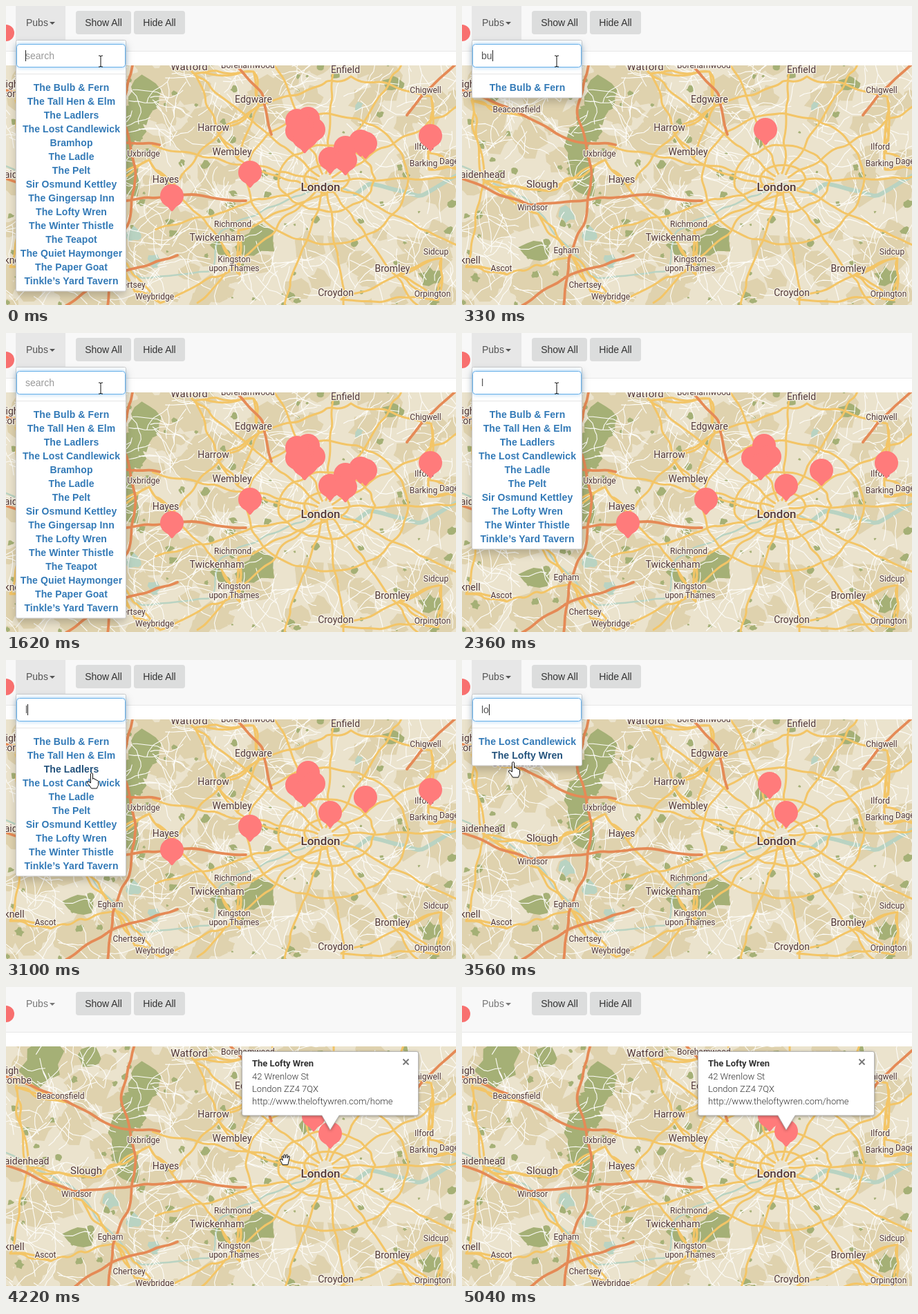
Write an HTML page that moves like this. It is 651 px wide and 433 px high and loops after 5140 ms.

```html
<!DOCTYPE html>
<html lang="en">
<head>
<meta charset="utf-8">
<title>Pub finder map</title>
<style>
  html, body { margin: 0; width: 100%; height: 100%; overflow: hidden; background: #fff; }
  svg { display: block; width: 651px; height: 433px; }
  text { font: 14px "Liberation Sans", Arial, sans-serif; }
  .road { fill: none; stroke-linecap: round; stroke-linejoin: round; }
  .label text { font-family: Roboto, sans-serif; fill: #523735; stroke: #f5f1e6; stroke-width: 2.5px;
    stroke-linejoin: round; paint-order: stroke; text-anchor: middle; }
  .info text { font: 300 13px Roboto, sans-serif; fill: #333; }
  .info .title { font-weight: 700; }
  .info .box { fill: #fff; stroke: #aaa; stroke-width: .8; filter: drop-shadow(0 1px 2px rgba(0,0,0,.35)); }
  .panel { fill: #fff; stroke: #c9c9c9; filter: drop-shadow(0 6px 6px rgba(0,0,0,.19)); }
  .field { fill: #fff; stroke: #66afe9; filter: drop-shadow(0 0 3px rgba(102,175,233,.6)); }
  .item { font-weight: 700; letter-spacing: .1px; text-anchor: middle; fill: #337ab7; }
  .item.hover { fill: #23527c; }
</style>
</head>
<body>
<svg id="stage" viewBox="0 0 651 433"></svg>
<script>
const LOOP = 5140, FRAME = 92.5, BLINK = 530;
const CLICK = 3835, INFO = 3927, DRAG = 4020, BOUNCE = 3993;
const SELECT = 967, CLEAR = 1060;

// name, x and y of the pin head
const pubs = [
  ['The Bulb & Fern', 439, 179], ['The Tall Hen & Elm', 437, 163], ['The Ladlers', 353, 241],
  ['The Lost Candlewick', 445, 179], ['Bramhop', 428, 172], ['The Ladle', 421, 181],
  ['The Pelt', 240, 275], ['Sir Osmund Kettley', 432, 191], ['The Gingersap Inn', 421, 166],
  ['The Lofty Wren', 469, 221], ['The Winter Thistle', 614, 188], ['The Teapot', 513, 196],
  ['The Quiet Haymonger', 491, 205], ['The Paper Goat', 491, 223], ['Tinkle’s Yard Tavern', 520, 199]
];
const chosen = 'The Lofty Wren';

// what the search field holds after each key press
const typing = [[0, ''], [227, 'b'], [320, 'bu'], [412, 'bul'], [CLEAR, ''], [1800, 'l'], [3280, 'lo']];

// time, x and y of the pointer, joined by straight moves
const pointer = [
  [0, 137, 80], [2600, 137, 80], [2720, 140, 80], [2820, 140, 80], [3090, 124, 163], [3280, 124, 163],
  [3550, 74, 147], [CLICK, 80, 142], [DRAG, 80, 142], [4200, 404, 250], [4297, 408, 252], [4482, 577, 378], [4570, 700, 460]
];

// size: town, centre and baseline
const labels = {
  12: 'Borehamwood 350 90, Chigwell 607 126, Ilford 605 208, Barking 604 232, Dagenham 656 229, Uxbridge 199 218, ' +
      'Windsor 102 296, Beaconsfield 79 154, Richmond 328 320, Kingston 330 371, upon Thames 330 384, Egham 151 358, ' +
      'Chertsey 178 408, Ascot 57 384, Weybridge 215 425, Sidcup 622 360, Orpington 617 421',
  14: 'Enfield 491 97, Edgware 358 140, Harrow 300 181, Wembley 327 216, Hayes 231 256, Maidenhead 24 249, High 4 118, ' +
      'Wycombe 6 132, Twickenham 305 340, Bracknell -2 373, Bromley 559 385, Croydon 477 420',
  15: 'Watford 265 93, Slough 116 263',
  17: 'London 455 268'
};
const towns = Object.entries(labels).flatMap(([size, list]) => list.split(', ').map(entry => {
  const [, name, x, y] = entry.match(/(.+) (\S+) (\S+)$/);
  return { name, x: +x, y: +y, size };
}));

const motorways = [
  [[188, 70], [166, 150], [188, 240], [180, 305], [154, 365], [147, 435]],
  [[0, 250], [98, 289], [187, 280], [262, 273], [347, 282]],
  [[0, 122], [80, 153], [165, 197], [222, 201]],
  [[325, 78], [372, 128], [384, 186]],
  [[651, 84], [605, 125], [580, 158]],
  [[85, 435], [150, 392], [248, 361]]
];
const thames = [[0, 232], [100, 285], [150, 345], [190, 393], [298, 385], [310, 325], [402, 284], [466, 256], [505, 273]];
const estuary = [[505, 273], [525, 257], [562, 266], [600, 276], [651, 246]];

// centre and radius
const woods = [[52, 104, 32], [122, 96, 15], [362, 340, 23], [106, 356, 19], [433, 194, 10], [560, 112, 13], [308, 350, 10], [614, 392, 14]];
const lakes = [[152, 302, 12], [187, 331, 11], [214, 369, 9], [510, 145, 6]];

const cursors = {
  beam: '<path d="M-3-8h2l1 1 1-1h2M0-7V7M-3 8h2l1-1 1 1h2" fill="none" stroke="#111"/>',
  point: '<path d="M-1.5 1.5q1.5-2 3 0v8l1-1q2 0 2 1.5 2-.5 2.5 1.2 2.3-.2 2.5 1.5v6q-1 1-2 4.3h-8q-2-4-6-8-.5-2.5 2-2l3 2z" fill="#fff" stroke="#111"/>',
  grab: '<path d="M-4 7.5C-5 4-8 1-7.5-.5q1.500-1 4 1.500L-5-4q.2-1.600 1.700-1L-2-2-2.200-6.500q1-1.800 2.200 0l.5 4 1-4.500q1.500-1.200 2 .5l-.4 4.500 1.600-3q1.600-.6 1.600 1L5 2 3.800 7.500z" fill="#fff" stroke="#111"/>'
};

const rand = (seed => () => (seed = seed * 16807 % 2147483647) / 2147483647)(4217);
const jitter = size => (rand() - .5) * 2 * size;
const times = (count, make) => Array.from({ length: count }, (_, i) => make(i));
const clamp = v => Math.min(1, Math.max(0, v));
const distance = (a, b) => Math.hypot(a.x - b.x, a.y - b.y);
const point = (x, y) => `${x.toFixed(1)} ${y.toFixed(1)}`;

// a winding line through the key points
function winding(keys, amount = 3) {
  const p = [keys[0]];
  keys.slice(1).forEach(([x, y], i) => {
    const [u, v] = keys[i], parts = Math.ceil(Math.hypot(x - u, y - v) / 16);
    for (let k = 1; k < parts; k++)
      p.push([u + (x - u) * k / parts + jitter(amount), v + (y - v) * k / parts + jitter(amount)]);
    p.push([x, y]);
  });
  const bends = p.slice(1, -1).map(([x, y], i) =>
    `Q${point(x, y)} ${point((x + p[i + 2][0]) / 2, (y + p[i + 2][1]) / 2)}`);
  return `M${point(...p[0])}${bends.join('')}L${point(...p[p.length - 1])}`;
}
const road = (d, color, width) => `<path class="road" d="${d}" stroke="${color}" stroke-width="${width}"/>`;

function blob([x, y, r]) {
  return 'M' + times(11, i => {
    const d = r * (.6 + rand() * .65), a = i * Math.PI * 2 / 11;
    return point(x + d * 1.1 * Math.cos(a), y + d * Math.sin(a));
  }).join('L') + 'z';
}

// patches that keep clear of the city centre
const scatter = (count, size, gap) => times(count, () => [rand() * 651, 74 + rand() * 360, size * (.3 + rand())])
  .filter(([x, y]) => Math.hypot((x - 455) / 1.3, y - 250) > gap).map(blob).join('');

const streets = count => times(count, () => {
  let a = rand() * 6.3;
  return `M${point(rand() * 651, 74 + rand() * 360)}` + times(6, () => {
    const step = 5 + rand() * 8;
    a += jitter(.5);
    return `l${point(step * Math.cos(a), step * Math.sin(a))}`;
  }).join('');
}).join('');

// main roads: spokes and rings around the centre, then links between neighbouring towns
const spokes = times(13, i => {
  const a = (i * 360 / 13 - 2) * Math.PI / 180;
  return winding([12, 120, 255].map(r => [462 + r * Math.cos(a), 254 + r * Math.sin(a)]), 4);
});
const rings = [[33, 20], [70, 48], [118, 95]].map(([rx, ry]) => winding(times(17, i => {
  const a = i * Math.PI / 8;
  return [464 + rx * Math.cos(a), 250 + ry * Math.sin(a)];
}), 3));
const links = towns.flatMap(town => towns.filter(other => distance(town, other) > 40)
  .sort((a, b) => distance(town, a) - distance(town, b)).slice(0, 2)
  .map(other => winding([[town.x + 8, town.y + 5], [other.x + 8, other.y + 5]], 5)));
const mainRoads = [...spokes, ...rings, ...links].join('');
const orangeRoads = motorways.map(keys => winding(keys, 2)).join('');

const valley = times(10, i => [184 + 16 * Math.cos(i * .5), 122 + i * 15, 19]);

const map = `
  <rect y="70" width="651" height="370" fill="#ebe3cd"/>
  <path d="${scatter(210, 21, 95)}" fill="#dfd2ae"/>
  <path d="${scatter(110, 5, 45) + [...woods, ...valley].map(blob).join('')}" fill="#a5b076"/>
  <path d="${lakes.map(blob).join('')}" fill="#b9d3c2"/>
  ${road(winding(thames), '#b9d3c2', 2.5)}${road(winding(estuary, 1), '#b9d3c2', 6)}
  ${road(streets(430), '#fdfcf8', 1.1)}
  ${road(mainRoads, '#f3c567', 3)}
  ${road(orangeRoads, '#e58a56', 3.8)}
  <g class="label">${towns.map(({ name, x, y, size }) =>
    `<text x="${x}" y="${y}" style="font-size:${size}px;font-weight:${size > 16 ? 500 : 400}">${name}</text>`).join('')}</g>`;

const button = (x, width, label) => `<rect x="${x}" y="7" width="${width}" height="34" rx="4" fill="#dcdddd"/>
  <text x="${x + width / 2}" y="29" text-anchor="middle" fill="#333">${label}</text>`;

const stage = document.getElementById('stage');
stage.innerHTML = `
  <clipPath id="view"><rect y="86" width="651" height="347"/></clipPath>
  <rect width="651" height="433" fill="#fff"/>
  <g clip-path="url(#view)"><g id="pan">${map}
    ${pubs.map(() => `<path class="pin" fill="#ff7b7b"
      d="M-17 0a17 17 0 1 1 34 0c0 8-5 13-11 16L1.5 21.5q-1.5 1.5-3 0L-6 16c-6-3-11-8-11-16z"/>`).join('')}
    <g class="info" id="info">
      <path class="box" d="M344 85.5H594q2.5 0 2.5 2.5V175.5q0 2.5-2.5 2.5H482L469 199 457 178H344q-2.5 0-2.5-2.5V88q0-2.5 2.5-2.5z"/>
      <text class="title" x="356" y="107">${chosen}</text>
      ${['42 Wrenlow St', 'London ZZ4 7QX', 'http://www.theloftywren.com/home'].map((line, i) =>
        `<text x="356" y="${126 + 18 * i}">${line}</text>`).join('')}
      <path d="M574.5 96.5l8 8m0-8l-8 8" stroke="#777" stroke-width="1.8"/>
    </g>
  </g></g>
  <rect width="651" height="65" fill="#f8f8f8"/><rect y="65" width="651" height="1" fill="#e7e7e7"/>
  <circle cx="0" cy="39" r="12" fill="#f8706f"/>
  <rect id="tab" x="14" width="72" height="50" fill="#e7e7e7"/>
  <g id="tabText"><text x="29" y="29">Pubs</text><path d="M63 23h8l-4 4z"/></g>
  ${button(101, 80, 'Show All')}${button(185, 74, 'Hide All')}
  <g id="menu">
    <rect class="panel" id="panel" x="14.5" y="49.5" width="159" rx="2"/>
    <rect class="field" x="15.5" y="55.5" width="157" height="33" rx="4"/>
    <rect id="selection" x="28" y="64" height="16" fill="#3390ff"/>
    <text id="query" x="28" y="77"></text>
    <rect id="caret" y="64" width="1" height="16" fill="#222"/>
    <rect x="15" y="98" width="158" height="1" fill="#e5e5e5"/>
    ${pubs.map(([name]) => `<text class="item" x="94.5">${name.replace('&', '&amp;')}</text>`).join('')}
  </g>
  <g id="cursor"></g>`;

const get = id => document.getElementById(id);
const set = (node, attrs) => Object.entries(attrs).forEach(([key, value]) => node.setAttribute(key, value));
const show = (node, on) => set(node, { display: on ? 'inline' : 'none' });
const pins = [...stage.querySelectorAll('.pin')], items = [...stage.querySelectorAll('.item')];

const bounce = t => t < BOUNCE ? 0 : 20 * (1 - (2 * ((t - BOUNCE) / 700 % 1) - 1) ** 2);

function pointerAt(t) {
  const i = pointer.findIndex(([time]) => time > t);
  if (i < 0) return pointer[pointer.length - 1].slice(1);
  const [t0, x0, y0] = pointer[i - 1], [t1, x1, y1] = pointer[i], k = (t - t0) / (t1 - t0);
  return [Math.round(x0 + (x1 - x0) * k), Math.round(y0 + (y1 - y0) * k)];
}

function draw(time) {
  const t = Math.max(0, DRAG + Math.floor((time - DRAG) / FRAME) * FRAME + .5);
  const [pressed, text] = typing.filter(([start]) => start <= t).pop();
  const open = t < CLICK, selected = t >= SELECT && t < CLEAR;
  const matches = pubs.filter(([name]) => name.toLowerCase().includes(text));
  const [px, py] = pointerAt(t);
  const row = py < 90 ? -1 : Math.floor((py - 108) / 20);

  pubs.forEach((pub, i) => {
    const [name, x, y] = pub, place = matches.indexOf(pub);
    show(pins[i], place >= 0);
    show(items[i], place >= 0);
    set(items[i], { y: 123 + 20 * place, class: place === row ? 'item hover' : 'item' });
    set(pins[i], { transform: `translate(${x} ${y - (name === chosen ? bounce(t) : 0)})` });
  });

  show(get('menu'), open);
  show(get('tab'), open);
  set(get('tabText'), { fill: open ? '#555' : '#777' });
  set(get('panel'), { height: 63.5 + 20 * matches.length });

  const query = get('query');
  query.textContent = text || 'search';
  set(query, { fill: selected ? '#fff' : text ? '#555' : '#999' });
  const width = open && text ? Math.round(query.getComputedTextLength()) : 0;
  set(get('selection'), { width: selected ? width : 0 });
  set(get('caret'), { x: 28 + width });
  show(get('caret'), !selected && Math.floor((t - pressed) / BLINK) % 2 === 0);

  show(get('info'), t >= INFO);
  set(get('pan'), { transform: `translate(0 ${Math.round(8 * clamp((t - DRAG) / 180))})` });
  const kind = open && py < 90 ? 'beam' : open && row < matches.length ? 'point' : 'grab';
  get('cursor').innerHTML = cursors[kind];
  set(get('cursor'), { transform: `translate(${px} ${py})` });
}

const begin = performance.now();
function tick() {
  draw((performance.now() - begin) % LOOP);
  requestAnimationFrame(tick);
}
tick();
</script>
</body>
</html>
```
